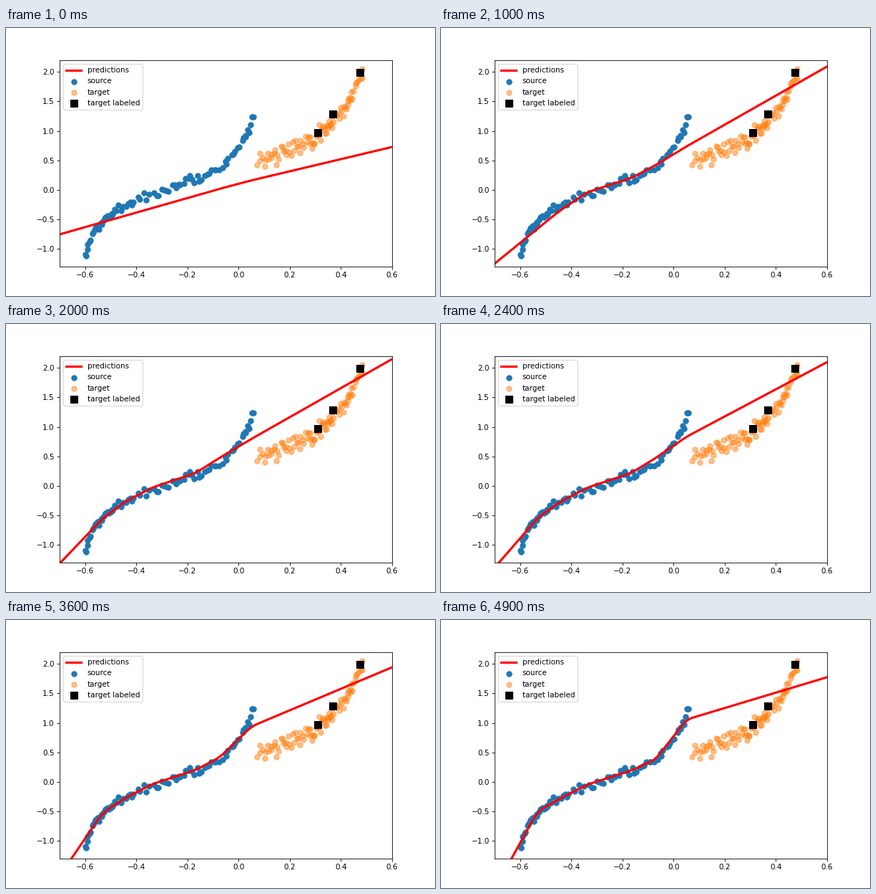
Write a matplotlib script that moves like this. It is 600 px wide and 374 px high and loops after 5000 ms.

```python
import numpy as np
import matplotlib.pyplot as plt
from matplotlib.animation import FuncAnimation

WIDTH, HEIGHT, DPI = 600, 374, 75
FRAMES, INTERVAL = 50, 100
XLIM, YLIM = (-0.7, 0.6), (-1.3, 2.2)

# All points below are in stage pixels, y down.
# Trends: each stretch between two points holds equally many observations.
SOURCE_TREND = [(109, 317), (124, 285), (137, 266), (155, 253), (178, 242),
                (217, 225), (245, 216), (272, 209), (303, 193), (330, 160),
                (347, 124)]
TARGET_TREND = [(351, 181), (370, 178), (388, 173), (405, 163), (422, 158),
                (436, 150), (449, 138), (458, 130), (474, 112), (484, 92),
                (500, 60)]
LABELED = [(435.8, 145.5), (457.2, 120.3), (495, 62)]

# Corners of the fitted curve at the turning points of the training
CORNERS = np.array([60, 135, 165, 205, 265, 300, 343, 560])
MOMENTS = [0, 6, 15, 20, 49]
START = 217 - np.where(CORNERS < 325, 0.284, 0.237) * (CORNERS - 325)
POSES = np.array([
    START,
    [335, 280, 258, 229, 211, 197, 175, 62.7],
    [348.7, 280, 253, 229, 208.5, 184.5, 153.5, 17],
    [350, 271.5, 249, 228, 208, 186, 160.5, 37.6],
    [403, 267, 250, 229.5, 210.5, 195, 139, 73.8],
])
ROUNDING = np.linspace(-8, 8, 9)

rng = np.random.default_rng(4)
plt.rcParams["font.family"] = "DejaVu Sans"

fig, ax = plt.subplots(figsize=(WIDTH / DPI, HEIGHT / DPI), dpi=DPI)
fig.subplots_adjust(left=0.125, right=0.9, bottom=0.11, top=0.88)
ax.set(xlim=XLIM, ylim=YLIM)


def to_data(px, py):
    """Convert stage pixels (y down) to axes data."""
    x = XLIM[0] + (np.asarray(px) / WIDTH - 0.125) / 0.775 * (XLIM[1] - XLIM[0])
    y = YLIM[0] + (0.89 - np.asarray(py) / HEIGHT) / 0.77 * (YLIM[1] - YLIM[0])
    return x, y


def sample(trend, count, first_noise, last_noise):
    """Spread noisy observations evenly along a trend."""
    steps = np.arange(len(trend))
    along = (np.arange(count) + rng.random(count)) / count * steps[-1]
    x, y = (np.interp(along, steps, axis) for axis in np.transpose(trend))
    noise = np.linspace(first_noise, last_noise, count)
    return x, y + noise * rng.standard_normal(count).clip(-2, 2)


def scatter(points, **style):
    ax.scatter(*to_data(*points), **style)


line, = ax.plot([], [], color="red", lw=3, label="predictions")
scatter(sample(SOURCE_TREND, 86, 3.5, 3.5), color="C0", s=50, label="source")
scatter(sample(TARGET_TREND, 86, 8, 5), color="C1", s=50, alpha=0.5,
        label="target")
scatter(np.transpose(LABELED), color="black", marker="s", s=100,
        label="target labeled")
ax.legend(loc="upper left")

grid = np.linspace(75, 540, 300)


def update(frame):
    heights = [np.interp(frame, MOMENTS, track) for track in POSES.T]
    curve = np.mean([np.interp(grid + shift, CORNERS, heights)
                     for shift in ROUNDING], axis=0)
    line.set_data(*to_data(grid, curve))
    return line,


anim = FuncAnimation(fig, update, frames=FRAMES, interval=INTERVAL,
                     repeat=True, repeat_delay=0)
plt.show()
```
